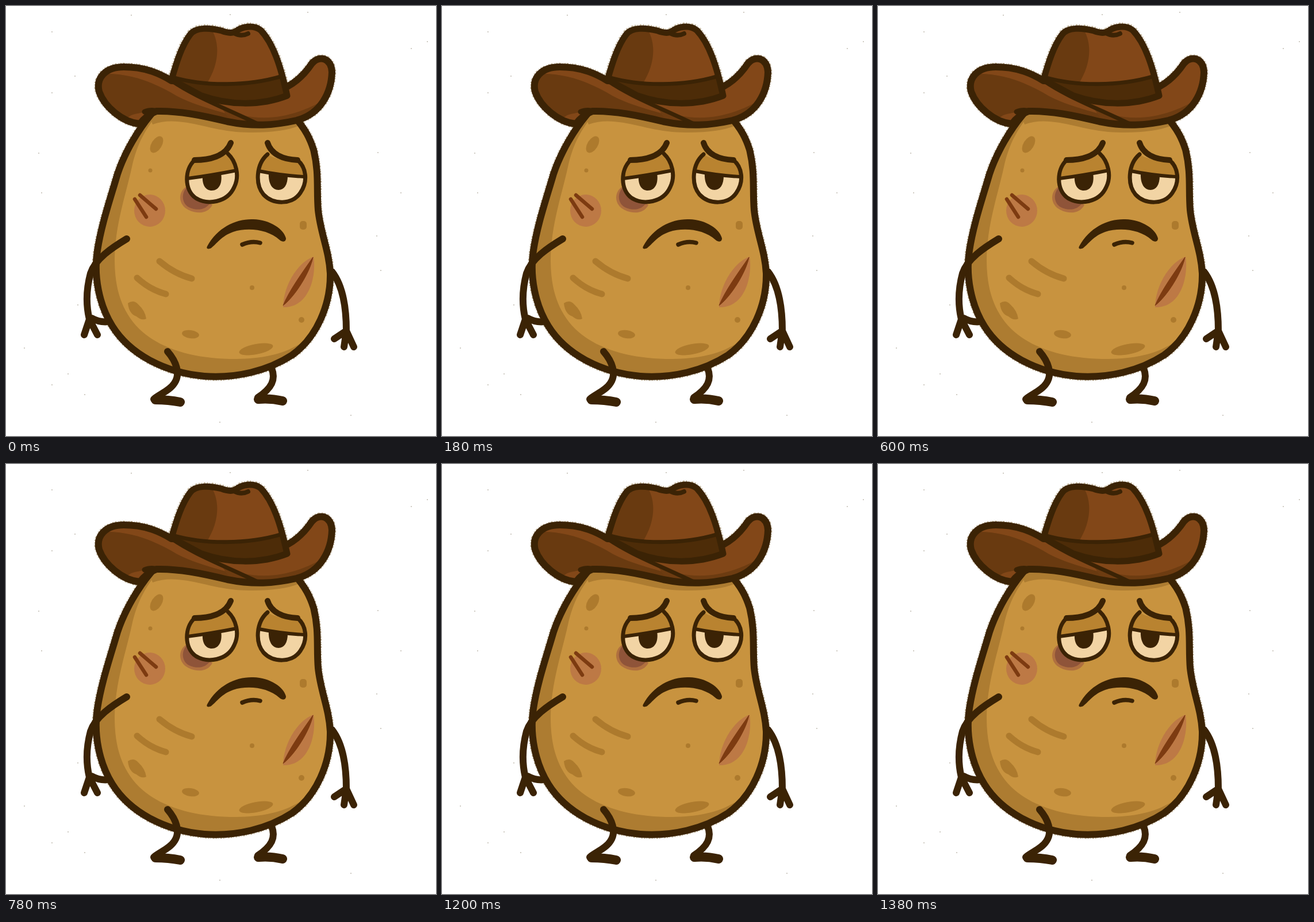
These frames come from a looping animation (748x748 px, 1500 ms). An HTML page:

```html
<!DOCTYPE html>
<html lang="en">
<head>
<meta charset="utf-8">
<title>Sad potato</title>
<style>
  html, body { margin: 0; width: 100%; height: 100%; overflow: hidden; background: #fff; }
  svg { display: block; width: 100%; height: 100%; }
  .line { fill: none; stroke: #3b2305; stroke-linecap: round; stroke-linejoin: round; }
  .ink { fill: #3b2305; }
  .spot { fill: #ad7a2d; }
  .dent { fill: none; stroke: #ad7a2d; stroke-width: 11; stroke-linecap: round; }
  .cut { fill: none; stroke: #7d3b11; stroke-width: 6.5; stroke-linecap: round; }
  .fringe { fill: none; stroke: #a3906a; stroke-width: 15; stroke-dasharray: 2 2 1 3 3 2; opacity: .6; }
</style>
</head>
<body>
<svg viewBox="0 0 748 748">
  <defs>
    <path id="body" d="M258 182C230 213 206 256 194 292C180 340 166 380 159 425C152 470 162 520 185 557C215 605 275 638 345 644C400 648 455 635 498 607C540 577 565 520 564 465C562 425 547 395 543 355C540 320 545 290 535 250C528 228 520 215 508 200L500 176L275 170Z"/>
    <path id="brim" d="M288 130C265 116 240 106 205 106C172 106 156 126 162 149C171 175 203 203 233 205Q244 190 262 183C300 182 340 190 385 201C430 210 465 208 505 199C548 188 566 150 567 115C566 90 545 85 532 100C520 118 505 132 488 141Z"/>
    <path id="crown" d="M288 128C296 100 305 70 320 50C330 36 355 38 375 43C385 47 393 48 400 44C410 36 430 32 443 42C465 65 478 105 489 156C440 175 385 172 340 156Z"/>
    <clipPath id="inBody"><use href="#body"/></clipPath>
    <clipPath id="inBrim"><use href="#brim"/></clipPath>
    <clipPath id="inCrown"><use href="#crown"/></clipPath>
  </defs>

  <g id="specks" fill="#b9b3a8"></g>

  <g id="potato">
    <g id="fringe">
      <use href="#body" class="fringe"/>
      <use href="#brim" class="fringe"/>
      <use href="#crown" class="fringe"/>
    </g>

    <use href="#body" fill="#c8933f"/>
    <g clip-path="url(#inBody)">
      <path fill="#ad7c31" d="M270 180C244 212 228 238 219 280C208 330 190 380 189 440C189 490 200 530 232 562C270 598 330 614 400 614C455 613 492 604 530 575L560 700H100V180Z"/>
      <path fill="#ad7c31" d="M240 165L255 206C300 190 345 214 400 219C450 222 490 218 515 206L500 165Z"/>
    </g>

    <ellipse class="spot" cx="262" cy="241" rx="9" ry="16" transform="rotate(32 262 241)"/>
    <circle class="spot" cx="251" cy="286" r="3.5"/>
    <rect class="spot" x="511" y="374" width="12" height="15" rx="5"/>
    <circle class="spot" cx="428" cy="490" r="4"/>
    <circle class="spot" cx="514" cy="546" r="5"/>
    <ellipse class="spot" cx="321" cy="571" rx="15" ry="7" transform="rotate(8 321 571)"/>
    <ellipse class="spot" cx="435" cy="597" rx="30" ry="9" transform="rotate(-11 435 597)"/>
    <path class="spot" d="M212 517Q222 510 230 519Q242 530 244 544Q236 548 227 540Q214 536 212 517Z"/>
    <path class="dent" d="M267 444Q293 466 323 474M228 473Q251 494 278 501"/>

    <ellipse cx="250" cy="356" rx="27" ry="28" fill="#bd7945"/>
    <path class="cut" d="M233 329L261 353M224 336L244 367"/>
    <path fill="#bd7945" d="M482 524C482 490 505 447 535 436C540 465 530 525 482 524Z"/>
    <path fill="#7d3b11" stroke="#7d3b11" stroke-linejoin="round" d="M482 521C492 496 515 464 534 437C529 463 503 505 482 521Z"/>

    <path fill="#b0703f" d="M318 312C298 320 298 346 318 355C335 363 352 360 359 346Z"/>
    <path fill="#8f5439" d="M316 314C303 326 306 345 320 351C335 357 348 353 354 344Z"/>

    <path fill="#f2d4a4" d="M328 268C310 285 310 320 330 334C350 347 385 342 397 315C407 295 400 270 386 257Q365 269 328 268Z"/>
    <path fill="#b98330" d="M328 268Q314 283 316 300Q355 295 402 286Q400 270 386 257Q365 269 328 268Z"/>
    <path class="ink" d="M342 296L374 291C377 309 370 321 358 321C347 321 341 311 342 296Z"/>
    <path class="line" stroke-width="6" d="M316 300Q355 295 401 286"/>
    <path class="line" stroke-width="7" d="M328 268C310 285 310 320 330 334C350 347 385 342 397 315C407 295 400 270 386 257"/>
    <path class="line" stroke-width="10" d="M328 268C353 268 382 262 391 238"/>

    <path fill="#f2d4a4" d="M455 258C435 275 433 310 448 328C465 346 498 346 512 325C526 305 522 280 507 268Q475 270 455 258Z"/>
    <path fill="#b98330" d="M455 258Q440 272 439 287Q480 295 520 297Q520 280 507 268Q475 270 455 258Z"/>
    <path class="ink" d="M457 290L490 295C490 311 484 320 474 320C463 320 456 309 457 290Z"/>
    <path class="line" stroke-width="6" d="M440 287Q480 295 519 297"/>
    <path class="line" stroke-width="7" d="M455 258C435 275 433 310 448 328C465 346 498 346 512 325C526 305 522 280 507 268"/>
    <path class="line" stroke-width="10" d="M455 238C461 258 482 267 507 268"/>

    <path class="ink" d="M350 418C368 385 400 370 430 371C460 372 483 388 487 404C487 411 481 411 476 407C455 388 420 385 395 393C375 400 366 414 357 421C351 424 348 422 350 418Z"/>
    <path class="line" stroke-width="7.5" d="M411 415Q427 408 442 412"/>

    <use href="#body" class="line" stroke-width="12"/>

    <g class="line" stroke-width="12">
      <path d="M210 405C185 420 155 440 147 465C139 495 139 520 145 545M145 545L136 572M145 545L159 572M149 543Q163 551 179 549"/>
      <path d="M567 462C585 485 592 520 592 565M592 565L571 579M592 565L588 593M592 565L605 593"/>
      <path d="M281 601C296 618 304 640 293 656C284 670 265 676 257 684"/>
      <path d="M462 630C470 650 462 665 438 681"/>
      <path stroke-width="16" d="M260 685Q283 685 303 689M439 684Q460 682 481 687"/>
    </g>

    <use href="#brim" fill="#824718"/>
    <g clip-path="url(#inBrim)">
      <path fill="#693a10" d="M150 120C215 110 270 140 300 158C345 180 380 183 440 206L260 188L246 182C225 192 210 180 200 220L150 200Z"/>
      <path fill="#6d3c11" d="M375 177C430 204 490 198 545 168L520 215H400Z"/>
    </g>
    <use href="#brim" class="line" stroke-width="12"/>
    <path class="line" stroke-width="7" d="M288 130C325 156 375 175 438 205"/>
    <path class="line" stroke-width="9" d="M241 184Q252 179 270 184"/>

    <use href="#crown" fill="#824718"/>
    <g clip-path="url(#inCrown)">
      <path fill="#693a10" d="M280 30H350C372 55 375 95 348 137H280Z"/>
      <path fill="#4d2c08" d="M280 122C340 140 420 140 482 122L500 180H280Z"/>
    </g>
    <path class="line" stroke-width="7" d="M290 124C345 140 420 140 480 122"/>
    <use href="#crown" class="line" stroke-width="11"/>
    <path class="line" stroke-width="8" d="M396 47Q409 54 421 48"/>
  </g>
</svg>
<script>
  const STEP = 300;
  const SWAY = [0, -7.5, 0, 7.5, 0];
  const get = id => document.getElementById(id);
  const potato = get('potato'), fringe = get('fringe'), specks = get('specks');

  // Stray flecks around the drawing, visible only in the upright pose.
  const flecks = '80,45 218,16 390,15 525,11 705,74 80,151 120,122 57,256 647,255 62,325 687,325 ' +
    '645,400 652,460 32,595 80,659 125,520 108,640 137,676 372,724 600,712 733,62';
  specks.innerHTML = flecks.split(' ').map(p => {
    const [x, y] = p.split(',');
    return `<circle cx="${x}" cy="${y}" r="0.9"/>`;
  }).join('');

  function draw(time) {
    const dx = SWAY[Math.floor(time / STEP) % SWAY.length];
    potato.setAttribute('transform', `translate(${dx} 0)`);
    const visibility = dx ? 'hidden' : 'visible';
    fringe.setAttribute('visibility', visibility);
    specks.setAttribute('visibility', visibility);
  }

  function tick() {
    draw(performance.now());
    requestAnimationFrame(tick);
  }
  tick();
</script>
</body>
</html>
```
